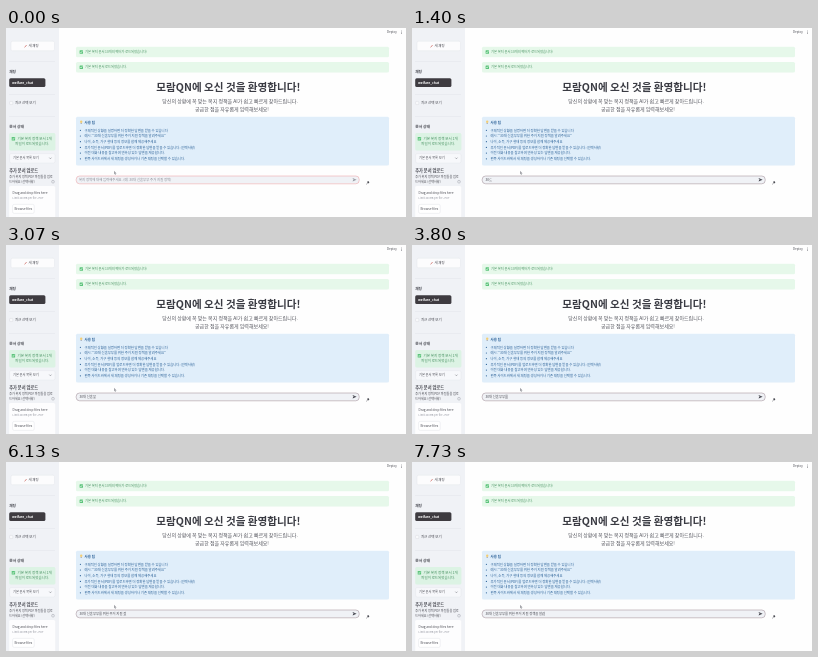
Write an HTML page with a canvas that moves like this. It is 400 px wide and 189 px high and loops after 8 s.

```html
<!DOCTYPE html>
<html lang="ko">
<head>
<meta charset="utf-8">
<title>복지 정책 상담</title>
<style>
html, body { margin: 0; width: 100%; height: 100%; overflow: hidden; background: #fff; }
canvas { display: block; width: 400px; height: 189px; }
</style>
</head>
<body>
<canvas id="stage"></canvas>
<script>
const W = 400, H = 189, LOOP = 8000;
const LEFT = 70, WIDE = 313;
const FONT = '"Noto Sans CJK KR", "Noto Sans CJK", "Noto Sans", sans-serif';
const INK = '#484951', GREEN = '#45905f', BLUE = '#2c6298', RULE = '#e3e5eb';

const canvas = document.getElementById('stage');
const ctx = canvas.getContext('2d');
const scale = window.devicePixelRatio || 1;
canvas.width = Math.round(W * scale);
canvas.height = Math.round(H * scale);

// Keystrokes: [time, text, syllable still being composed]
const couple = '30대 신혼부부를 ';
const home = couple + '위한 ';
const aid = home + '주거 ';
const policy = aid + '지원 ';
const ask = policy + '정책을 ';
const keys = [
  [0, '', ''], [800, '3', ''], [1000, '30', ''],
  [1400, '30', 'ㄷ'], [1600, '30', '대'],
  [2000, '30대 ', 'ㅅ'], [2130, '30대 ', '시'], [2270, '30대 ', '신'], [2400, '30대 신', 'ㅎ'],
  [2670, '30대 신', '혼'], [2800, '30대 신혼', '부'],
  [3400, '30대 신혼부', 'ㅂ'], [3530, '30대 신혼부', '부'], [3670, '30대 신혼부부', 'ㄹ'],
  [3730, '30대 신혼부부', '르'], [3800, '30대 신혼부부', '를'],
  [3930, couple, 'ㅇ'], [4070, couple, '위'], [4200, couple + '위', 'ㅎ'],
  [4270, couple + '위', '하'], [4330, couple + '위', '한'],
  [4470, home, 'ㅈ'], [4670, home, '주'],
  [4870, home + '주', 'ㄱ'], [5000, home + '주', '거'],
  [5330, aid, 'ㅈ'], [5400, aid, '지'],
  [5730, aid + '지', 'ㅇ'], [5800, aid + '지', '우'], [5870, aid + '지', '워'], [5930, aid + '지', '원'],
  [6000, policy, 'ㅈ'], [6070, policy, '저'], [6130, policy, '정'], [6270, policy + '정', 'ㅊ'],
  [6670, policy + '정', '책'], [6730, policy + '정책', '으'],
  [7000, policy + '정책', '을'], [7130, ask, '아'], [7330, ask, '알'],
  [7470, ask + '알', 'ㄹ'], [7730, ask + '알', '려']
];

function text(str, x, y, size, color = INK, weight = 400, align = 'left') {
  ctx.font = `${weight} ${size}px ${FONT}`;
  ctx.fillStyle = color;
  ctx.textAlign = align;
  ctx.textBaseline = 'middle';
  ctx.fillText(str, x, y);
}

function box(x, y, w, h, r, fill, stroke, line = 0.4) {
  ctx.beginPath();
  ctx.roundRect(x, y, w, h, r);
  if (fill) { ctx.fillStyle = fill; ctx.fill(); }
  if (stroke) { ctx.strokeStyle = stroke; ctx.lineWidth = line; ctx.stroke(); }
}

function path(points, color, line) {
  ctx.beginPath();
  points.forEach(([x, y], i) => i ? ctx.lineTo(x, y) : ctx.moveTo(x, y));
  if (line) {
    ctx.strokeStyle = color;
    ctx.lineWidth = line;
    ctx.stroke();
  } else {
    ctx.closePath();
    ctx.fillStyle = color;
    ctx.fill();
  }
}

function dot(x, y, r, color) {
  ctx.beginPath();
  ctx.arc(x, y, r, 0, Math.PI * 2);
  ctx.fillStyle = color;
  ctx.fill();
}

function check(x, y) {
  box(x - 1.7, y - 1.7, 3.4, 3.4, 0.5, '#5cc47b');
  path([[x - 1, y], [x - 0.3, y + 0.8], [x + 1, y - 0.9]], '#fff', 0.6);
}

function sidebar() {
  box(0, 0, 53, H, 0, '#f0f2f6');
  [33, 66.6, 88].forEach(y => box(3, y, 46, 0.4, 0, RULE));

  box(5, 13.2, 43.5, 9.6, 1.6, '#fcfcfd', '#e0e2e7');
  path([[18.6, 19.4], [20.6, 17]], '#d0706a', 0.8);
  text('새 채팅', 22.4, 18, 3.4);

  text('채팅', 3.2, 44, 3.7, INK, 700);
  box(3.2, 50.2, 36.2, 8.8, 1.5, '#3e3b40');
  text('welfare_chat', 6, 54.5, 3.3, '#fff', 700);

  box(3.6, 73.4, 3.2, 3.2, 0.6, '#f8f9fb', '#d3d5db');
  text('최근 선택 보기', 8.9, 75, 3.5);

  text('문서 상태', 3.2, 99, 3.8, INK, 700);
  box(3.2, 105, 46.2, 17.4, 1.5, '#dcf3e4');
  check(7.4, 110.7);
  text('기본 복지 정책 문서 1개', 11.6, 110.7, 3.5, GREEN);
  text('파일이 로드되었습니다.', 9.2, 116, 3.5, GREEN);

  box(3.6, 125.6, 45.4, 9.4, 1.5, '#f7f8fb', '#e0e2e7');
  text('기본 문서 목록 보기', 7, 130.2, 3.2);
  path([[43.3, 129.6], [44.4, 130.8], [45.5, 129.6]], INK, 0.4);

  text('추가 문서 업로드', 3.2, 142.2, 4.2, INK, 700);
  text('추가 복지 정책 PDF 파일들을 업로', 3.2, 149.3, 3.1);
  text('드하세요 (선택사항)', 3.2, 153.8, 3.1);
  ctx.beginPath();
  ctx.arc(47, 153.7, 1.4, 0, Math.PI * 2);
  ctx.strokeStyle = '#8d909a';
  ctx.lineWidth = 0.4;
  ctx.stroke();
  text('?', 47, 153.7, 2, '#8d909a', 400, 'center');

  box(3.2, 158, 46, 40, 1.5, '#fdfdfe');
  text('Drag and drop files here', 6.6, 165, 3.15);
  text('Limit 200MB per file • PDF', 6.6, 169.6, 2.6, '#92959f');
  box(6.6, 176.4, 21.6, 9, 1.5, '#fff', '#dcdee3');
  text('Browse files', 17.4, 180.8, 3.2, INK, 400, 'center');
}

const tips = [
  '구체적인 상황을 설명하면 더 정확한 답변을 받을 수 있습니다',
  '예시: "30대 신혼부부를 위한 주거 지원 정책을 알려주세요"',
  '나이, 소득, 가구 형태 등의 정보를 함께 제공해주세요',
  '추가적인 문서(PDF)를 업로드하면 더 정확한 답변을 받을 수 있습니다.(선택사항)',
  '이전 대화 내용을 참고하여 연속성 있는 답변을 제공합니다.',
  '왼쪽 사이드바에서 새 채팅을 생성하거나 기존 채팅을 선택할 수 있습니다.'
];

function content() {
  text('Deploy', 381, 4.2, 3);
  [2.9, 4.2, 5.5].forEach(y => dot(395.6, y, 0.4, INK));

  [[24, '기본 복지 문서 10개의 벡터가 로드되었습니다!'],
   [39.2, '기본 복지 문서 로드되었습니다.']].forEach(([y, str]) => {
    box(LEFT, y - 5.2, WIDE, 10.4, 1.5, '#e6f8ea');
    check(75.3, y);
    text(str, 79, y, 3.25, GREEN);
  });

  text('모람QN에 오신 것을 환영합니다!', 294.5, 59, 10.6, '#3a3b43', 700, 'right');
  text('당신의 상황에 꼭 맞는 복지 정책을 AI가 쉽고 빠르게 찾아드립니다.', 224, 72.6, 5, '#56575f', 400, 'center');
  text('궁금한 점을 자유롭게 입력해보세요!', 226, 81, 5, '#56575f', 400, 'center');

  box(LEFT, 88.8, WIDE, 48.6, 1.5, '#e0eefa');
  dot(75.2, 93.8, 1.2, '#f2cd74');
  box(74.6, 95, 1.2, 0.9, 0, '#a5a8b0');
  text('사용 팁', 78.6, 94.3, 3.5, BLUE, 700);
  tips.forEach((tip, i) => {
    const y = 102.3 + i * 5.7;
    dot(74.4, y, 0.6, BLUE);
    text(tip, 78.5, y, 3.36, BLUE);
  });
}

function input(t) {
  const [, done, part] = keys.findLast(k => t >= k[0]);
  const full = done + part;
  box(70.2, 148, 283, 7.8, 3.4, '#f0f2f6', t < 1000 ? '#eda9ae' : '#a8989f', 0.6);
  if (full) {
    text(full, 73.4, 151.6, 3.3);
    if (part) {
      const x = 73.4 + ctx.measureText(done).width;
      box(x, 153.4, ctx.measureText(part).width, 0.25, 0, '#85868e');
    }
  } else {
    text('복지 정책에 대해 입력해주세요. (예: 30대 신혼부부 주거 지원 정책)', 73, 151.6, 3.38, '#8a8c96');
  }
  path([[346.6, 149.9], [350.6, 151.7], [346.6, 153.5], [347.1, 152], [348.7, 151.7], [347.1, 151.4]],
    full ? INK : '#9a9da6');
}

function pointers() {
  path([[360.2, 156.4], [362, 154.6]], INK, 0.5);
  path([[361, 154], [362.2, 153.1], [363.4, 154.2], [362.4, 155.4]], INK);
  path([[108, 142.8], [108, 146.6], [108.9, 145.8], [109.5, 147.1], [110.1, 146.8], [109.5, 145.6], [110.7, 145.5]],
    '#a3a4a9');
}

function draw(now) {
  ctx.setTransform(canvas.width / W, 0, 0, canvas.height / H, 0, 0);
  box(0, 0, W, H, 0, '#fefefe');
  sidebar();
  content();
  input((now - start) % LOOP);
  pointers();
}

function loop() {
  draw(performance.now());
  requestAnimationFrame(loop);
}

const start = performance.now();
loop();
</script>
</body>
</html>
```
